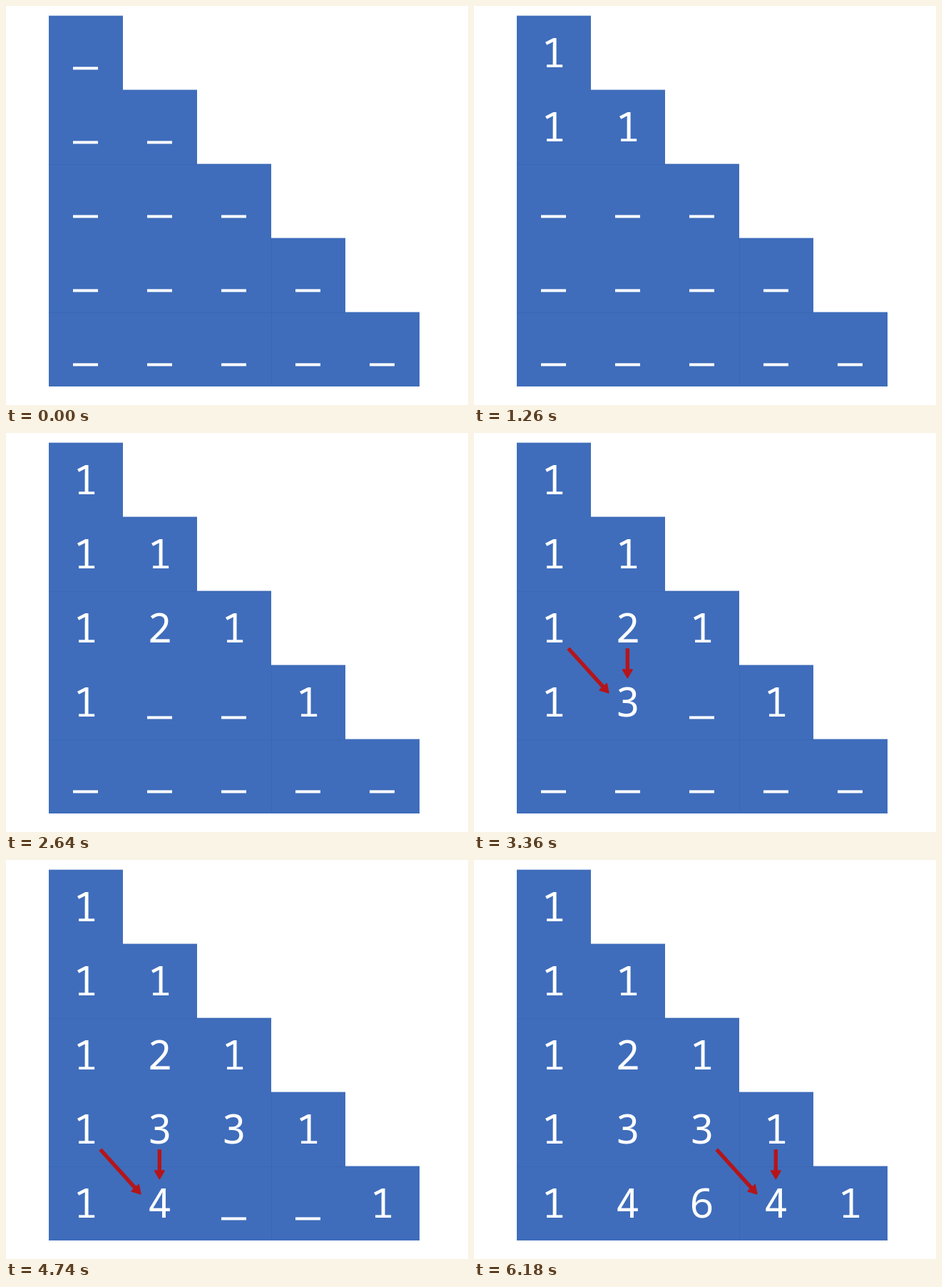
Animation, 648 px wide and 560 px high, one loop 6360 ms. Source, as an HTML page:

```html
<!DOCTYPE html>
<html lang="en">
<head>
<meta charset="utf-8">
<title>Number triangle</title>
<style>
  html, body { margin: 0; width: 100%; height: 100%; overflow: hidden; background: #fff; }
  svg { display: block; width: 648px; height: 560px; filter: blur(0.6px); }
  text { font: 400 57px "Noto Sans Mono", "DejaVu Sans Mono", monospace; fill: #fff; text-anchor: middle; }
  .block { fill: #3f6dbb; }
  .seam { stroke: #3a67b3; stroke-width: 1; fill: none; }
  .dash { fill: #fff; }
  .shaft { stroke: #b5151a; stroke-width: 5.4; }
  .head { fill: #b5151a; stroke: #b5151a; stroke-width: 2; stroke-linejoin: round; }
</style>
</head>
<body>
<svg id="stage" viewBox="0 0 648 560"></svg>
<script>
const LOOP = 6360, TICK = 60, CELL = 104, ROWS = 5, LEFT = 60, TOP = 13.6;
const stage = document.getElementById("stage");
const parts = [];

// One beat per reveal or arrow removal, in ticks.
const beats = [5, 17, 26, 35, 42, 50, 57, 62, 71, 79, 85, 89, 94, 98];
let beat = 0;
const now = () => beat < beats.length ? beats[beat] * TICK : LOOP;

function add(tag, attrs, parent = stage) {
  const el = document.createElementNS("http://www.w3.org/2000/svg", tag);
  for (const key in attrs) el.setAttribute(key, attrs[key]);
  return parent.appendChild(el);
}

function arrow(parent, x1, y1, x2, y2) {
  const length = Math.hypot(x2 - x1, y2 - y1);
  const angle = Math.atan2(y2 - y1, x2 - x1) * 180 / Math.PI;
  const g = add("g", { transform: `translate(${x1} ${y1}) rotate(${angle})` }, parent);
  add("line", { class: "shaft", x2: length - 10 }, g);
  add("path", { class: "head", d: `M${length - 1} 0l-11 -6.5v13z` }, g);
}

function arrowPair(row, col, on, off) {
  const g = add("g", {});
  const x = 111.3 + col * CELL, y = 302.3 + (row - 3) * CELL;
  arrow(g, x, y, x, y + 42);
  arrow(g, x - 83, y, x - 26, y + 63);
  parts.push({ el: g, on, off });
}

function cell(row, col, value, on) {
  const x = 111.5 + col * CELL, y = 86 + row * CELL;
  const dash = add("rect", { class: "dash", x: x - 17.5, y: y - 0.6, width: 35, height: 4 });
  const digit = add("text", { x, y });
  digit.textContent = value;
  parts.push({ el: dash, on: 0, off: on }, { el: digit, on, off: LOOP });
}

for (let row = 0; row < ROWS; row++)
  add("rect", { class: "block", x: LEFT, y: TOP + row * CELL, width: CELL * (row + 1), height: CELL + 0.4 });
add("path", { class: "seam", d: "M60 222.5H372M60 430.5H476M372.5 326V533" });

// Each row opens with its ones, then fills in the sums with arrows from left to right.
let above = [];
for (let row = 0; row < ROWS; row++) {
  const values = [], opening = now();
  if (row < 2) beat++;
  for (let col = 0; col <= row; col++) {
    const inner = col > 0 && col < row;
    values[col] = inner ? above[col - 1] + above[col] : 1;
    if (inner) beat++;
    const on = inner ? now() : opening;
    cell(row, col, values[col], on);
    if (inner) {
      beat++;
      arrowPair(row, col, on, now());
    }
  }
  above = values;
}

// The sums of one row share a beat between an arrow leaving and the next row opening.
function draw() {
  const t = performance.now() % LOOP;
  for (const { el, on, off } of parts)
    el.style.visibility = t >= on && t < off ? "visible" : "hidden";
  requestAnimationFrame(draw);
}
draw();
</script>
</body>
</html>
```
